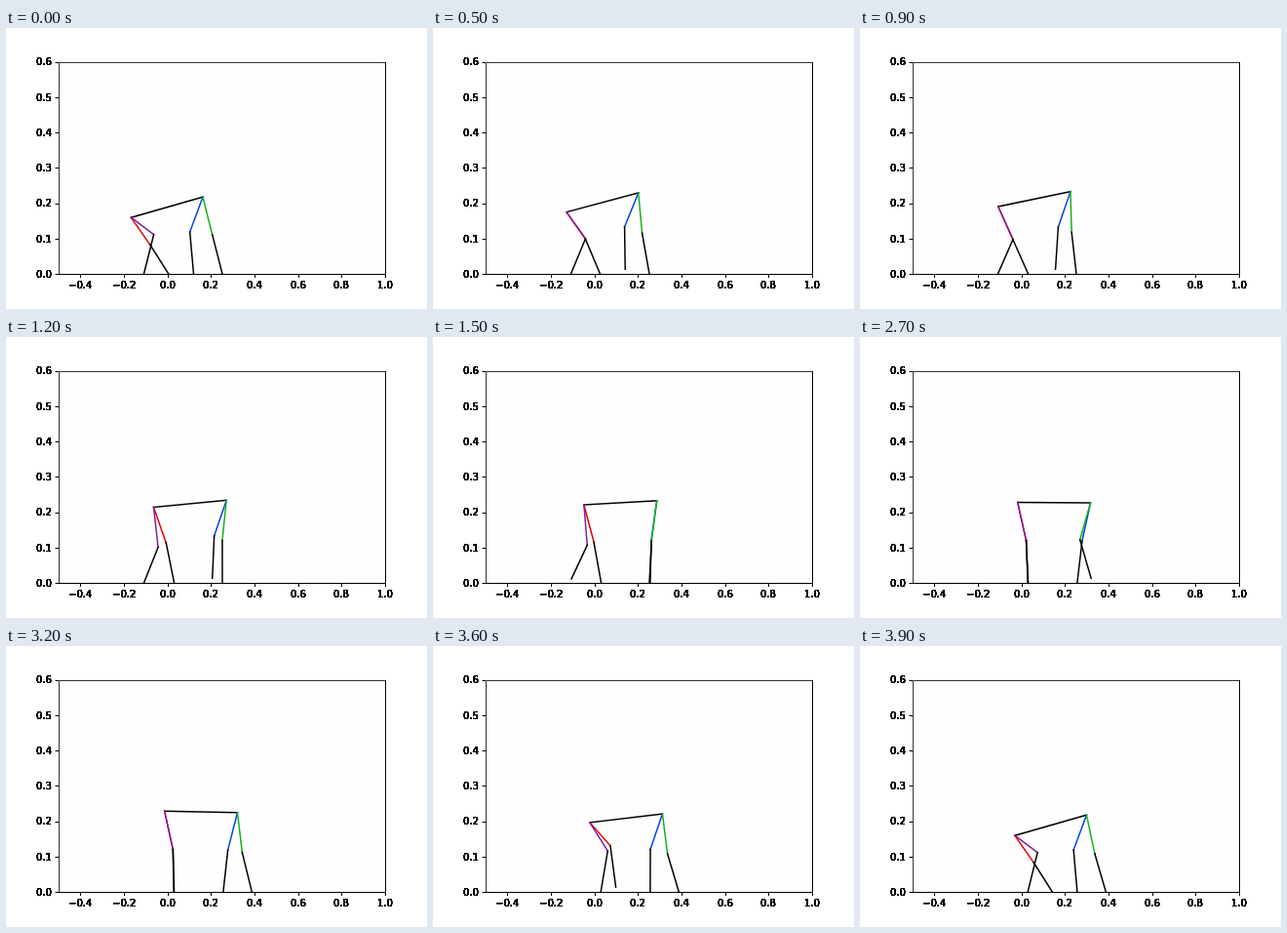
Animation of 432x288 px, one loop 4000 ms. Source, as an HTML page:

```html
<!DOCTYPE html>
<html lang="en">
<head>
<meta charset="utf-8">
<title>Walking linkage</title>
<style>
  html, body { margin: 0; width: 100%; height: 100%; overflow: hidden; background: #fff; }
  svg { display: block; width: 432px; height: 288px; }
  text { font: 10px "DejaVu Sans", sans-serif; }
</style>
</head>
<body>
<svg viewBox="0 0 432 288">
  <clipPath id="plot"><rect x="54" y="34.56" width="334.8" height="217.44"/></clipPath>
  <rect x="54" y="35" width="335" height="217" fill="#fefefe"/>
  <g id="robot" clip-path="url(#plot)" fill="none" stroke-width="1.5" stroke-linecap="square"></g>
  <g id="axes" fill="none"></g>
</svg>
<script>
const LOOP = 4000, STEP = 100;
const SX = 223.2, SY = 362.4;          // pixels per unit
const ZERO = 165.6, GROUND = 252;
const BODY = 0.335, THIGH = 0.115, SHANK = 0.12;
const LIFT = 4.8;

// Body poses: ms, hind hip x, hind hip y, front hip y
const poses = [
  [0, 128.3, 194.2, 173.3], [500, 137, 188.7, 169], [900, 141.8, 183, 167.6],
  [1200, 151.5, 174.5, 167.4], [1500, 154.9, 172, 167.9], [2100, 159.2, 170, 169.3],
  [3200, 162.7, 169.3, 170.7], [3900, 158.8, 194.2, 173.3]
];

// Each foot starts at x, glides by [from, to, distance] and is raised during lift
const legs = [
  { color: '#e50000', hind: true, x: 166.8, glides: [[0, 700, 5.8], [3200, 3900, 24.7]], lift: [3200, 3900] },
  { color: '#7e1e9c', hind: true, x: 141.5, glides: [[1450, 2100, 30.7]], lift: [1400, 2100] },
  { color: '#0343df', hind: false, x: 192.5, glides: [[0, 900, 8.1], [900, 1500, 22.3]], lift: [0, 1500] },
  { color: '#15b01a', hind: false, x: 222, glides: [[2400, 3000, 30.3]], lift: [2400, 3000] }
];

const progress = (t, from, to) => Math.min(1, Math.max(0, (t - from) / (to - from)));
const smooth = u => u * u * (3 - 2 * u);

// Monotone cubic interpolation of one column of the poses
function sample(t, col) {
  const last = poses.length - 2;
  let i = 0;
  while (i < last && t > poses[i + 1][0]) i++;
  const slope = k => (poses[k + 1][col] - poses[k][col]) / (poses[k + 1][0] - poses[k][0]);
  const tangent = k => {
    const a = slope(Math.max(0, k - 1)), b = slope(Math.min(last, k));
    return a * b > 0 ? 2 * a * b / (a + b) : 0;
  };
  const [from, to] = [poses[i], poses[i + 1]];
  const u = progress(t, from[0], to[0]), v = 1 - u;
  return from[col] + (to[col] - from[col]) * smooth(u)
    + (to[0] - from[0]) * u * v * (tangent(i) * v - tangent(i + 1) * u);
}

function footAt(leg, t) {
  const x = leg.glides.reduce((sum, [from, to, dx]) => sum + dx * smooth(progress(t, from, to)), leg.x);
  const u = progress(t, ...leg.lift);
  return [x, GROUND - LIFT * Math.min(1, 7 * u * (1 - u))];
}

// Two-link knee position; side is +1 for a forward bend, -1 for backward
function kneeAt(hip, foot, side) {
  const dx = (foot[0] - hip[0]) / SX, dy = (foot[1] - hip[1]) / SY;
  const len = Math.hypot(dx, dy), d = Math.min(len, THIGH + SHANK);
  const along = (d * d + THIGH * THIGH - SHANK * SHANK) / (2 * d);
  const off = side * Math.sqrt(Math.max(0, THIGH * THIGH - along * along));
  const ux = dx / len, uy = dy / len;
  return [hip[0] + (ux * along + uy * off) * SX, hip[1] + (uy * along - ux * off) * SY];
}

function add(parent, tag, attrs) {
  const el = document.createElementNS('http://www.w3.org/2000/svg', tag);
  for (const name in attrs) el.setAttribute(name, attrs[name]);
  return parent.appendChild(el);
}

const axes = document.getElementById('axes');
const robot = document.getElementById('robot');

// Stacked copies harden the glyph edges; align is the share of the width left of x
function label(n, x, y, align) {
  const el = add(axes, 'text', { y, fill: '#000' });
  el.textContent = (n < 0 ? '\u2212' : '') + Math.abs(n / 10).toFixed(1);
  el.setAttribute('x', Math.round(x - el.getComputedTextLength() * align));
  for (let i = 0; i < 20; i++) axes.appendChild(el.cloneNode(true));
}

function drawAxes() {
  const snap = v => Math.round(v) + 0.5;
  let edge = 'M389.5 35V252.5H54';
  for (let n = -4; n <= 10; n += 2) {
    const x = ZERO + n / 10 * SX;
    edge += `M${snap(x)} 252V256`;
    label(n, x, 267, 0.5);
  }
  for (let n = 0; n <= 6; n++) {
    const y = GROUND - n / 10 * SY;
    edge += `M54 ${snap(y)}H50.5`;
    label(n, 47, Math.round(y + 3.8), 1);
  }
  add(axes, 'path', { d: 'M54.5 252V35.5H389', stroke: '#333' });
  add(axes, 'path', { d: edge, stroke: '#000' });
}

drawAxes();
const body = add(robot, 'path', { stroke: '#000' });
for (const leg of legs) {
  leg.thigh = add(robot, 'path', { stroke: leg.color });
  leg.shank = add(robot, 'path', { stroke: '#000' });
}

const line = (el, a, b) => el.setAttribute('d', `M${a}L${b}`);

function render(ms) {
  const t = Math.floor(ms % LOOP / STEP) * STEP;
  const [hx, hy, fy] = [1, 2, 3].map(col => sample(t, col));
  const hind = [hx, hy];
  const front = [hx + SX * Math.sqrt(BODY ** 2 - ((fy - hy) / SY) ** 2), fy];
  line(body, hind, front);
  for (const leg of legs) {
    const hip = leg.hind ? hind : front;
    const foot = footAt(leg, t);
    const knee = kneeAt(hip, foot, leg.hind ? 1 : -1);
    line(leg.thigh, hip, knee);
    line(leg.shank, knee, foot);
  }
}

const start = performance.now();
function tick() {
  render(performance.now() - start);
  requestAnimationFrame(tick);
}
render(0);
requestAnimationFrame(tick);
</script>
</body>
</html>
```
